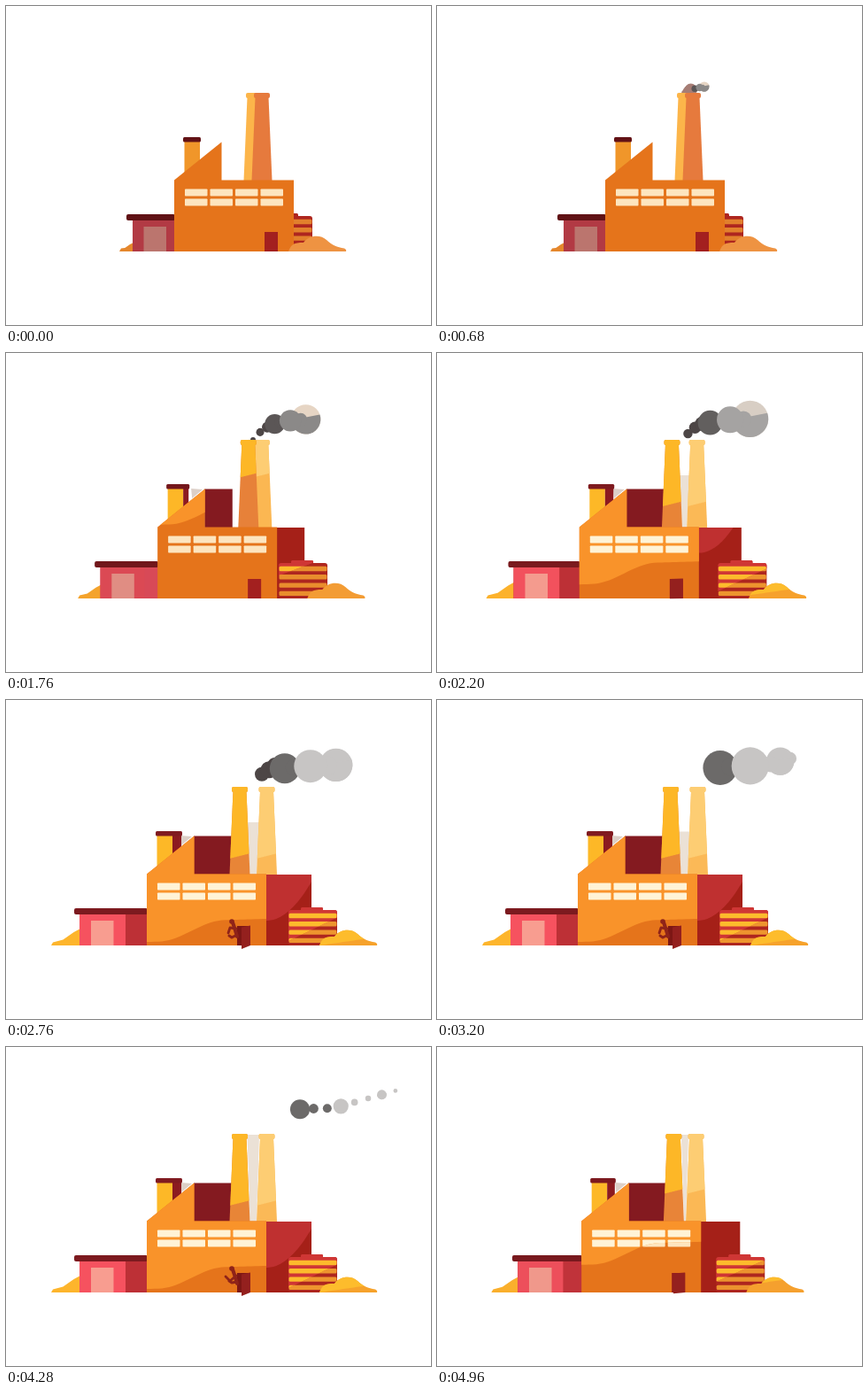
Write an HTML page with a canvas that moves like this. It is 480x360 px and loops after 5 s.

```html
<!DOCTYPE html>
<html lang="en">
<head>
<meta charset="utf-8">
<title>Factory</title>
<style>
html, body { margin: 0; width: 100%; height: 100%; overflow: hidden; background: #fff; }
canvas { display: block; }
</style>
</head>
<body>
<canvas id="stage" width="480" height="360"></canvas>
<script>
const c = document.getElementById('stage').getContext('2d');
const LOOP = 5000, GROUND = 277;
let u = 0; // how far the building has turned: 0 flat, 1 wide

const clamp = v => Math.max(0, Math.min(1, v));
const ramp = (t, a, b) => clamp((t - a) / (b - a));
const ease = x => (1 - Math.cos(Math.PI * x)) / 2;
const lerp = (a, b, k) => a + (b - a) * k;
const by = (a, b) => lerp(a, b, u);

function mix(a, b, k) {
  const ch = (h, i) => parseInt(h.slice(i, i + 2), 16);
  return `rgb(${[1, 3, 5].map(i => Math.round(lerp(ch(a, i), ch(b, i), k)))})`;
}
function poly(color, ...pts) {
  c.fillStyle = color;
  c.beginPath();
  pts.forEach(p => c.lineTo(...p));
  c.closePath();
  c.fill();
}
function box(color, x0, y0, x1, y1, r = 0) {
  c.fillStyle = color;
  c.beginPath();
  c.roundRect(x0, y0, Math.max(0, x1 - x0), y1 - y0, r);
  c.fill();
}
function dot(color, x, y, r, from = 0, to = 7) {
  c.fillStyle = color;
  c.beginPath();
  c.arc(x, y, r, from, to);
  c.fill();
}
function stroke(color, w, ...pts) {
  c.strokeStyle = color;
  c.lineWidth = w;
  c.lineCap = c.lineJoin = 'round';
  c.beginPath();
  pts.forEach(p => c.lineTo(...p));
  c.stroke();
}

// Profiles of the light edge, from 0 at the left to 1 at the right.
const slope = k => k;
const bowl = k => k * k;
const swell = k => .15 * k + .85 * ease(ramp(k, .1, .65));

// Draws only above a light edge that starts at (x, y) and climbs to the right.
function lit(x, y, w, rise, profile, draw) {
  c.save();
  c.beginPath();
  c.moveTo(x - 9, 0);
  c.lineTo(x - 9, y);
  for (let k = 0; k <= 1; k += 1 / 32) c.lineTo(x + w * k, y - rise * profile(k));
  c.lineTo(x + w + 9, y - rise);
  c.lineTo(x + w + 9, 0);
  c.clip();
  draw();
  c.restore();
}

function chimney(x, dark, light) {
  const shape = color => {
    box(color, x, 98, x + 18, 104, 2);
    poly(color, [x + 1.5, 103], [x + 16.5, 103], [x + 20.5, 197], [x - 2.5, 197]);
  };
  shape(dark);
  lit(x - 3, 82 + 97 * u, 24, 6, slope, () => shape(light));
}

function stack() {
  const x = by(200, 169), right = by(220, 199), split = x + 19;
  box(mix('#f0962a', '#fdb827', clamp(u * 1.6)), x + 1.5, 152, split, 197);
  box('#8c1a20', split, 152, right - 1, 180);
  box(mix('#621216', '#801a20', u), x, 148, right, 153.5, 1.5);
}

function shed(right) {
  const x = by(143, 83), split = by(190, 135), door = by(155.5, 96), tip = by(128, 51);
  poly(mix('#e5872c', '#fdb52c', u), [tip, GROUND], [tip + 2, 273.5],
    [lerp(tip, x, .42), by(273, 270.5)], [lerp(tip, x, .8), by(269, 262)], [x + 1, by(267, 258)], [x + 1, GROUND]);
  box(mix('#d94a58', '#bd3036', ramp(u, .6, .9)), x, 241, right + 1, GROUND);
  box(mix('#b23a44', '#f6525f', u), x, 241, split, GROUND);
  box(mix('#bb756e', '#f89d90', u), door, 249, door + 25.5, GROUND);
  box(mix('#601215', '#7c1a1f', u), by(136, 77), 235, right + 1, 242, 2);
}

function crates() {
  const x = by(291, 319), end = x + 55;
  const draw = (red, fill) => {
    box(red, x + 14, 234, x + 39, 240, 1.5);
    box(red, x, 237, end, GROUND, 3);
    for (let y = 240.8; y < 270; y += 9.3) box(fill, x + .5, y, end - .5, y + 5.4, 1.5);
  };
  draw('#ae261f', mix('#e2802c', '#ee952e', u));
  lit(x, by(219, 272), 56, by(12, 27), slope, () => draw('#cf3635', '#fdbb2c'));
}

function mound() {
  const x = by(319, 354), dune = color => {
    c.fillStyle = color;
    c.beginPath();
    c.moveTo(x, GROUND);
    c.bezierCurveTo(x + 3, 269, x + 6, 267, x + 17, 267);
    c.bezierCurveTo(x + 22, 259, x + 36, 257, x + 43, 264);
    c.bezierCurveTo(x + 49, 270, x + 55, 272, x + 63, 273.5);
    c.quadraticCurveTo(x + 66, 275, x + 65, GROUND);
    c.fill();
  };
  dune(mix('#ee9342', '#f6a22b', u));
  lit(x, by(216, 277), 62, 9, slope, () => dune('#fdbc2c'));
}

function front(x) {
  const face = color => poly(color, [x, GROUND], [x, 196.5], [x + 53.5, 153.5],
    [x + 53.5, 196.5], [x + 135, 196.5], [x + 135, GROUND]);
  const panes = color => {
    for (let i = 0; i < 8; i++) {
      const px = x + 12 + (i % 4) * 28.5, py = i < 4 ? 206.5 : 217.5;
      box(color, px, py, px + 25.5, py + 8, .8);
    }
  };
  face('#e5741b');
  panes('#fde5bf');
  lit(x, by(71, 273), 135, 26, swell, () => {
    face('#f9932a');
    panes('#fff3d6');
  });
}

function worker(x, y, swing) {
  const red = '#8f2319';
  stroke(red, 4, [x, y], [x + 2, y + 6], [x + 5, y + 16]);
  stroke(red, 2.8, [x + 4, y + 7], [x - 3, y + 6 + swing * 7], [x - 5 - 3 * swing, y + 12 - 4 * swing]);
  stroke(red, 3, [x + 5, y + 14], [x - 1, y + 17 - 2 * swing], [x - 4, y + 15 - 2 * swing]);
  dot(red, x - 1, y - 1, 2.8);
}

function entrance(t) {
  const x = by(292, 261);
  const open = ease(ramp(t, 2150, 2500)) - ease(ramp(t, 4750, 5100));
  const out = ease(ramp(t, 2350, 2700)) - ease(ramp(t, 4450, 4900));
  box(mix('#a3201f', '#7d1715', open), x, 255, x + 15, GROUND);
  if (out > 0) worker(x + 7 - 12 * out, 251, ease(ramp(t, 3650, 4250)));
  const free = x + 5 * open;
  if (open > 0) poly('#94201e', [free, 255 + 1.5 * open], [x + 15, 254.5], [x + 15, GROUND], [free, GROUND + 4 * open]);
}

// Height of the plume above x: a quick climb, a flat stretch, then a steady rise.
function plume(x, t) {
  const climb = 24 * (1 - Math.exp(-(x - 279) / 18)) + .28 * Math.max(0, x - 370);
  return 98 - climb * ramp(t, 200, 1400) - 5 * ramp(t, 3600, 4280);
}

const driftX = (i, t) => 286 + (46 + 15.4 * i) * Math.max(0, t - 215) / 4065;

// Small puffs that leave the chimney and merge into the last large one.
function tail(t) {
  const swellUp = ramp(t, 1760, 2760), merge = ease(ramp(t, 2760, 3500));
  const color = mix('#a67d75', '#4d4646', ramp(t, 700, 1300));
  for (let k = 0; k < 4; k++) {
    const x = lerp(279 + 8 * k * ramp(t, 300, 1500) + 10 * swellUp, driftX(0, t), merge);
    const r = (3 + 1.5 * k + 5 * swellUp) * ramp(t, 300, 700) * (1 - ramp(t, 3500, 3900));
    dot(color, x, plume(x, t) - 4 * swellUp * (1 - merge), r);
  }
}

// Each puff drifts at its own steady speed; the fast ones peak first and every third is large.
function smoke(t) {
  const age = ramp(t, 1760, 2760);
  tail(t);
  for (const i of [0, 1, 2, 7, 6, 5, 4, 3]) {
    const peak = 3600 - 36 * i * i, end = 4620 - 20 * i;
    const size = ramp(t, 300, peak) ** .8 * (1 - ramp(t, peak, end)) ** .6;
    const r = size * (i % 3 ? 11 : 21.5), x = driftX(i, t), y = plume(x, t);
    if (i < 3) dot(mix('#5b5656', '#6c6a69', age), x, y, r);
    else {
      const shade = mix('#8b8988', '#c7c5c4', age);
      dot(i > 5 ? mix('#e6d5c4', '#c7c5c4', age) : shade, x, y, r);
      if (i === 6) dot(shade, x, y, r, -.33, Math.PI - .05);
    }
  }
}

function haze(t, x) {
  if (u < .55) return;
  const top = lerp(138, 158, ramp(t, 2760, 3600)) - 59 * ramp(t, 3700, 4200);
  const l = by(300.5, 275.5), r = by(268.5, 283);
  if (r > l) poly('#ebe1d6', [l - 3, top], [r + 3, top], [r, 197], [l, 197]);
  poly('#dccfc7', [x + 38, 153], [x + 51, 154], [x + 39, 164]);
}

function draw(t) {
  u = ease(ramp(t, 850, 2450)) - ease(ramp(t, 4578, 6178));
  const x = by(190, 159), right = x + 135, edge = by(325, 345);
  const side = color => box(color, right - 1, 197, edge, GROUND);
  c.fillStyle = '#fff';
  c.fillRect(0, 0, 480, 360);
  haze(t, x);
  smoke(t);
  stack();
  box('#841a20', x + 53, 153.5, by(243, 264), 197);
  chimney(by(271, 285.5), mix('#fcb54a', '#fbb957', u), '#fdcd73');
  chimney(by(280, 255), mix('#e67a3d', '#e88537', u), '#fdb727');
  shed(x);
  if (u > 0) {
    side('#a52018');
    lit(right, 249 - 400 * (1 - u), edge - right, 44, bowl, () => side('#bf3030'));
  }
  crates();
  front(x);
  mound();
  entrance(t);
}

function tick() {
  draw(performance.now() % LOOP);
  requestAnimationFrame(tick);
}
tick();
</script>
</body>
</html>
```
